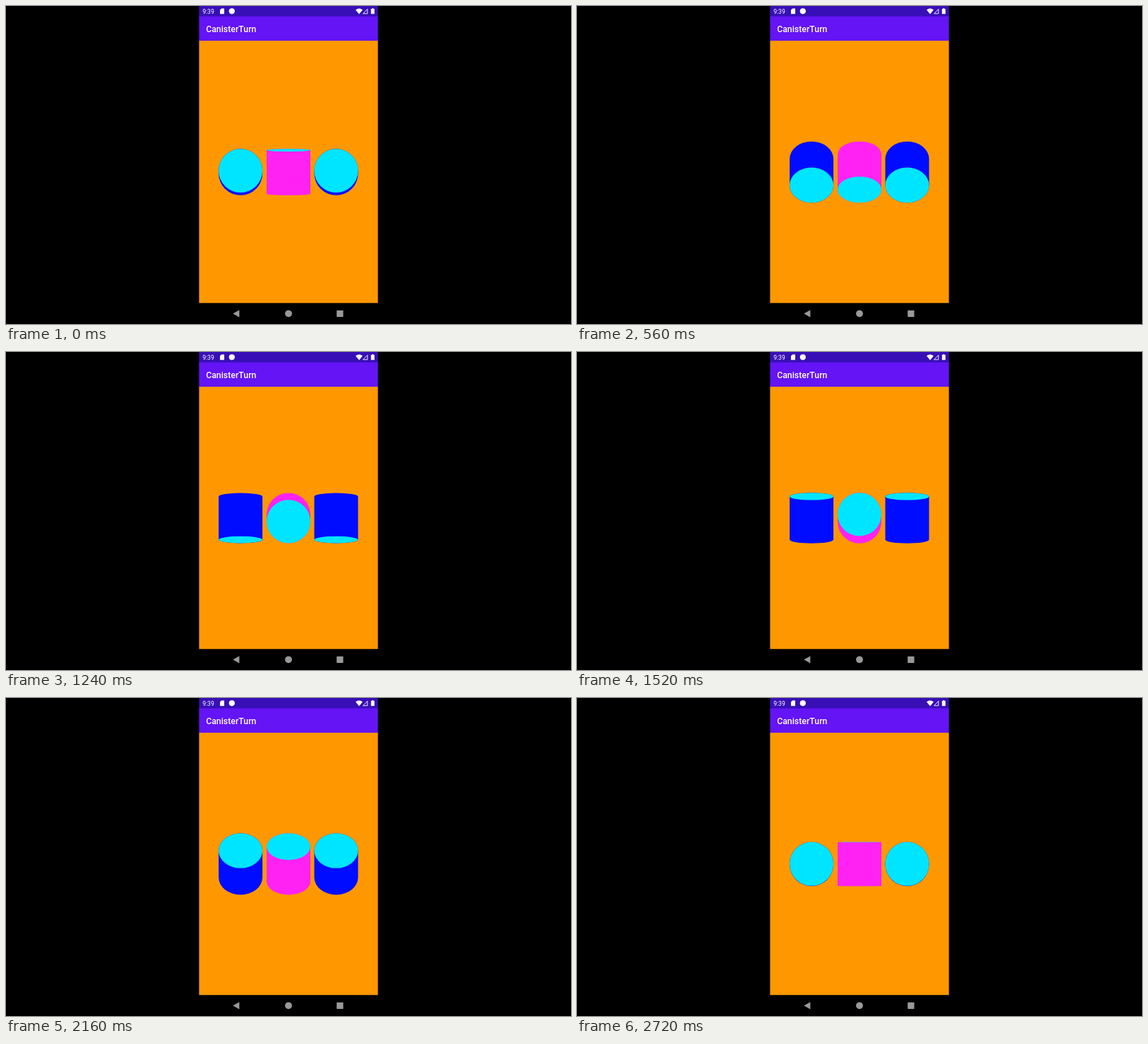
An HTML page for the animation above (2760 ms loop, 800x450 px).

```html
<!DOCTYPE html>
<html lang="en">
<head>
<meta charset="utf-8">
<title>Turning cylinders</title>
<style>
  html, body { margin: 0; width: 100%; height: 100%; overflow: hidden; background: #000; }
  svg { display: block; width: 800px; height: 450px; }
  text { font-family: Roboto, sans-serif; fill: #fff; }
</style>
</head>
<body>
<svg viewBox="0 0 800 450">
  <rect width="800" height="450" fill="#000"/>
  <g id="screen">
    <rect x="273.4" y="49" width="253.2" height="371.3" fill="#ff9800"/>
    <rect x="273.4" y="14" width="253.2" height="35.2" fill="#6414f5"/>
    <rect x="273.4" width="253.2" height="14.7" fill="#380fb7"/>
  </g>
  <text x="283.2" y="37" font-size="12.3" font-weight="500">CanisterTurn</text>
  <g id="status" fill="#fff">
    <text x="278.2" y="10.6" font-size="8.6">9:39</text>
    <path d="M305.2 3.4H309V11.2H303V5.6Z"/>
    <circle cx="319.8" cy="7.3" r="4.1"/>
    <path d="M495 5.6Q500 1.4 504.9 5.6L500 11.4Z"/>
    <path d="M505.6 10.8L511.8 4.4V10.8Z" fill="none" stroke="#fff" stroke-width=".9"/>
    <path d="M518.2 3.3H520.3V4.1H521.7V11.3H516.8V4.1H518.2Z"/>
  </g>
  <g id="nav" fill="#999">
    <path d="M321.3 435.3L330.4 430.2V440.4Z"/>
    <circle cx="400" cy="435.3" r="4.9"/>
    <rect x="468.2" y="430.7" width="9.3" height="9.2" rx=".6"/>
  </g>
  <g id="cylinders"></g>
</svg>
<script>
const LOOP = 2760, STEP = 40, R = 31, CY = 235;
// [ms, tilt in degrees] of the outer cylinders
const TILT = [[0, 3.5], [560, -36.6], [960, -62.3], [1520, -99.6],
              [1920, -128.6], [2400, -156.6], [2720, -179.6]];
const group = document.getElementById('cylinders');

function add(tag, fill) {
  const el = document.createElementNS('http://www.w3.org/2000/svg', tag);
  el.setAttribute('fill', fill);
  return group.appendChild(el);
}

function cylinder(x, color, toAngle) {
  const body = add('path', color), cap = add('ellipse', '#00e5ff');
  cap.setAttribute('cx', x);
  cap.setAttribute('rx', R);
  return tilt => {
    const a = toAngle(tilt) * Math.PI / 180;
    const ry = R * Math.abs(Math.cos(a));
    const half = R * Math.abs(Math.sin(a));
    const up = Math.sin(a) * Math.cos(a) > 0 ? -1 : 1;
    body.setAttribute('d',
      `M${x - R} ${CY - half}A${R} ${ry} 0 0 1 ${x + R} ${CY - half}` +
      `V${CY + half}A${R} ${ry} 0 0 1 ${x - R} ${CY + half}Z`);
    cap.setAttribute('cy', CY + up * half);
    cap.setAttribute('ry', ry);
  };
}

const outer = a => a, inner = a => 90 - a;
const cylinders = [
  cylinder(332.1, '#000cff', outer),
  cylinder(400, '#ff22f2', inner),
  cylinder(467.5, '#000cff', outer)
];

function tiltAt(t) {
  let i = 1;
  while (i < TILT.length - 1 && t > TILT[i][0]) i++;
  const [t0, a0] = TILT[i - 1], [t1, a1] = TILT[i];
  return a0 + (a1 - a0) * (t - t0) / (t1 - t0);
}

function draw(now) {
  const t = Math.floor((now % LOOP) / STEP) * STEP;
  const tilt = tiltAt(t);
  cylinders.forEach(turn => turn(tilt));
}

let start;
function tick(now) {
  start ??= now;
  draw(now - start);
  requestAnimationFrame(tick);
}
draw(0);
requestAnimationFrame(tick);
</script>
</body>
</html>
```
